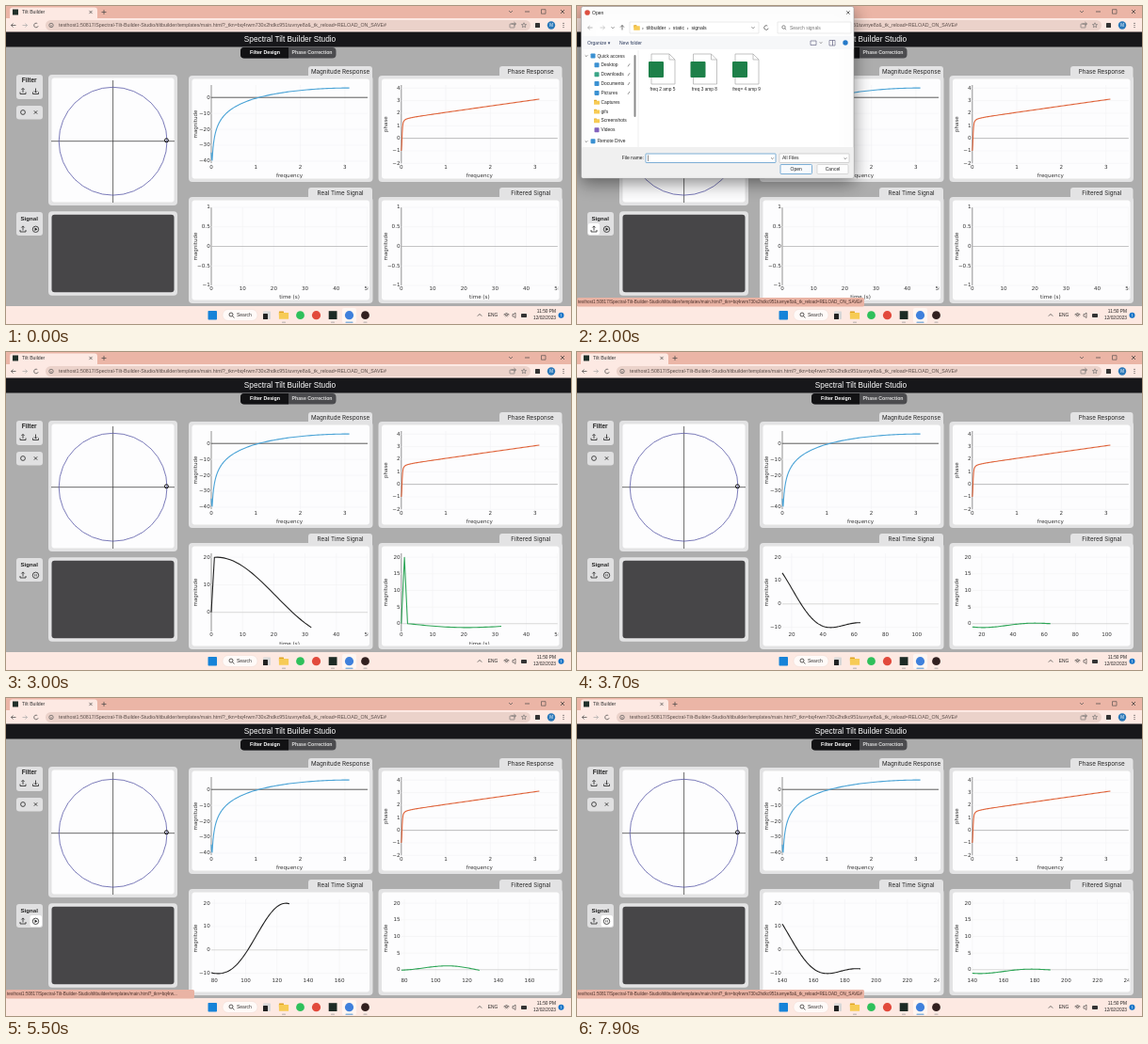
An HTML page with a canvas for the animation above (8 s loop, 600x338 px).

```html
<!DOCTYPE html>
<html lang="en">
<head>
<meta charset="utf-8">
<title>Tilt Builder</title>
<style>
html, body { margin: 0; width: 100%; height: 100%; overflow: hidden; background: #adadad; }
canvas { display: block; width: 600px; height: 338px; }
</style>
</head>
<body>
<canvas id="stage"></canvas>
<script>
const W = 600, H = 338, LOOP = 8000;
const UI = '"Liberation Sans", sans-serif';
const PLOT = '"DejaVu Sans", sans-serif';
const HEAD = 'Inter, sans-serif';
const cv = document.getElementById('stage');
const c = cv.getContext('2d');
const dpr = window.devicePixelRatio || 1;
cv.width = W * dpr;
cv.height = H * dpr;

const PAGE = 'testhost1:50817/Spectral-Tilt-Builder-Studio/tiltbuilder/templates/main.html?_tkn=';
const URL_TEXT = PAGE + 'bq4rwm730x2hdkc951tuvnye8z&_tk_reload=RELOAD_ON_SAVE#';
const URL_SHORT = PAGE + 'bq4rw...';

// ---------- drawing helpers ----------
function text(s, x, y, size, o = {}) {
  c.font = (o.bold ? 'bold ' : '') + size + 'px ' + (o.font || UI);
  c.textAlign = o.align || 'left';
  c.textBaseline = 'middle';
  c.fillStyle = o.color || '#222';
  if (o.rot) {
    c.save();
    c.translate(x, y);
    c.rotate(-Math.PI / 2);
    c.fillText(s, 0, 0);
    c.restore();
  } else c.fillText(s, x, y);
}
function box(x0, y0, x1, y1, fill, r = 0, stroke, lw = 0.6) {
  c.beginPath();
  c.roundRect(x0, y0, x1 - x0, y1 - y0, r);
  if (fill) { c.fillStyle = fill; c.fill(); }
  if (stroke) { c.strokeStyle = stroke; c.lineWidth = lw; c.stroke(); }
}
function disc(x, y, r, fill, stroke, lw = 0.7) {
  c.beginPath();
  c.arc(x, y, r, 0, 7);
  if (fill) { c.fillStyle = fill; c.fill(); }
  if (stroke) { c.strokeStyle = stroke; c.lineWidth = lw; c.stroke(); }
}
function path(pts, color = '#333', lw = 0.7) {
  c.beginPath();
  pts.forEach(([x, y], i) => i ? c.lineTo(x, y) : c.moveTo(x, y));
  c.strokeStyle = color;
  c.lineWidth = lw;
  c.lineJoin = 'round';
  c.stroke();
}
const line = (x0, y0, x1, y1, color, lw) => path([[x0, y0], [x1, y1]], color, lw);
function cross(x, y, r, color, lw) {
  line(x - r, y - r, x + r, y + r, color, lw);
  line(x - r, y + r, x + r, y - r, color, lw);
}
function chevron(x, y, r, dir = 1, color = '#555') {
  path([[x - r, y - dir * r / 2], [x, y + dir * r / 2], [x + r, y - dir * r / 2]], color, 0.7);
}
function arrow(x, y, dir, color = '#444') {
  line(x - 2.5, y, x + 2.5, y, color);
  path([[x + dir * 0.4, y - 2], [x + dir * 2.5, y], [x + dir * 0.4, y + 2]], color);
}
function reload(x, y) {
  c.beginPath();
  c.arc(x, y, 2.3, 0.3, 5.3);
  c.strokeStyle = '#444';
  c.lineWidth = 0.7;
  c.stroke();
}
function transfer(x, y, up) {
  path([[x - 3, y + 1], [x - 3, y + 3], [x + 3, y + 3], [x + 3, y + 1]], '#222', 0.8);
  line(x, y - 3, x, y + 1.5, '#222', 0.8);
  chevron(x, up ? y - 2.3 : y + 0.7, 1.7, up ? -1 : 1, '#222');
}
function folder(x, y, s = 1) {
  box(x - 3 * s, y - 2.4 * s, x, y, '#e0a526', 0.5);
  box(x - 3 * s, y - 1.6 * s, x + 3 * s, y + 2.4 * s, '#f7cb55', 0.5);
}

// ---------- filter: one zero just inside the unit circle ----------
const ZERO = { re: 0.99, im: 0.0157 };
const UNIT = { x: 113.6, y: 143.7, r: 57.4 };
const gain = w => 20 * Math.log10(Math.hypot(Math.cos(w) - ZERO.re, Math.sin(w) - ZERO.im));
const phase = w => Math.atan2(Math.sin(w) - ZERO.im, Math.cos(w) - ZERO.re);

// ---------- signals ----------
const wave = n => {
  if (n < 1) return 0;
  const p = 0.0507 * (n - 1.7);
  return 14 * Math.cos(p) + 6 * Math.cos(2 * p);
};
const filtered = n => n < 1 ? 0 : wave(n) - wave(n - 1);

const CLOCK = [[2300, 0], [3700, 64], [5300, 128], [6300, 128], [7900, 190]];
function samples(t) {
  if (t < CLOCK[0][0]) return -1;
  for (let i = 1; i < CLOCK.length; i++) {
    const [a, u] = CLOCK[i - 1], [b, v] = CLOCK[i];
    if (t <= b) return Math.floor(u + (v - u) * (t - a) / (b - a));
  }
  return 190;
}

// ---------- plots ----------
function axes(p) {
  const X = v => p.x + (v - p.x0) / (p.x1 - p.x0) * 166;
  const Y = v => p.bottom - (v - p.y0) / (p.y1 - p.y0) * (p.bottom - p.top);
  c.save();
  c.beginPath();
  c.rect(p.x - 20, p.top - 8, 186.4, p.clip - p.top + 8);
  c.clip();
  const label = { font: PLOT, color: '#333' };
  for (let v = Math.ceil(p.x0 / p.dx) * p.dx; v <= p.x1; v += p.dx) {
    line(X(v), p.top, X(v), p.bottom, v ? '#f1f1f3' : '#777', v ? 0.6 : 0.8);
    text(String(v), X(v), p.bottom + p.gap, 5.6, { ...label, align: 'center' });
  }
  for (let v = Math.ceil(p.y0 / p.dy) * p.dy; v <= p.y1 + 1e-6; v += p.dy) {
    line(p.x, Y(v), p.x + 166, Y(v), v ? '#f1f1f3' : p.zero, v ? 0.6 : 0.8);
    text(String(v).replace('-', '−'), p.x - 1.3, Y(v), 5.6, { ...label, align: 'right' });
  }
  text(p.ylab, p.x - 16, (p.top + p.bottom) / 2, 5.5, { ...label, align: 'center', rot: true });
  if (p.xlab) text(p.xlab, p.x + 83, p.xlabY, 5.6, { ...label, align: 'center' });
  path(p.pts.map(([x, y]) => [X(x), Y(y)]), p.color, 1.1);
  c.restore();
}
function response(x, y0, y1, dy, top, bottom, f, color, zero, ylab) {
  const pts = [];
  for (let w = 0; w < 3.14; w += w < 0.3 ? 0.01 : 0.05) pts.push([w, f(w)]);
  axes({ x, x0: 0, x1: 3.51, dx: 1, y0, y1, dy, top, bottom, gap: 4.5, clip: 186,
    zero, ylab, xlab: 'frequency', xlabY: 181, pts, color });
}
function signal(x, f, n, color) {
  const live = n >= 0, wide = n > 50, pts = [];
  let lo = 0, hi = 20;
  for (let i = 0; i <= n; i++) {
    const v = f(i);
    lo = Math.min(lo, v);
    hi = Math.max(hi, v);
    if (i >= n - 50) pts.push([i, v]);
  }
  const pad = (hi - lo) / 18, left = wide ? n - 50 : 0;
  axes({ x, x0: left, x1: left + (wide ? 100 : 50), dx: wide ? 20 : 10,
    y0: live ? lo - pad : -1, y1: live ? hi + pad : 1,
    dy: live ? (hi - lo > 25 ? 10 : 5) : 0.5,
    top: 214, bottom: 297, gap: 3.4, clip: live ? 311 : 313, zero: live ? '#cfcfcf' : '#b5b5b5',
    ylab: 'magnitude', xlab: wide ? '' : 'time (s)', xlabY: live ? 310.5 : 309.5, pts, color });
}

// ---------- page parts ----------
function browser() {
  box(0, 0, W, 14, '#ebb5a6');
  box(4, 1.5, 97, 16, '#fde9e3', 3);
  box(0, 13, W, 28, '#fde9e3');
  box(7, 3.5, 13, 9.5, '#20302a');
  text('Tilt Builder', 17, 6.7, 5.2, { color: '#333' });
  cross(90, 6.5, 1.6, '#444');
  line(101.5, 6.5, 106.5, 6.5, '#444');
  line(104, 4, 104, 9, '#444');
  chevron(536, 6, 2);
  line(551, 6, 556, 6, '#444');
  box(568.5, 3.7, 573, 8.2, null, 0, '#444');
  cross(591, 6, 2, '#333');
  arrow(8, 20.5, -1);
  arrow(20, 20.5, 1, '#aaa');
  reload(32, 20.5);
  box(42, 15, 557, 26, '#ebd2ca', 5.5);
  disc(48, 20.5, 2.2, null, '#555');
  line(48, 20, 48, 21.7, '#555');
  text(URL_TEXT, 56, 20.7, 5.3, { color: '#5a4c48' });
  box(535, 19, 540, 23, null, 0.5, '#666');
  arrow(539, 19, 1, '#666');
  path([0, 1, 2, 3, 4, 5, 6, 7, 8, 9, 10].map(i => {
    const r = i % 2 ? 1.2 : 2.7, a = i * Math.PI / 5 - Math.PI / 2;
    return [550 + r * Math.cos(a), 20.5 + r * Math.sin(a)];
  }), '#666', 0.6);
  box(562, 18, 567, 23, '#333', 0.6);
  disc(579, 20.5, 4.2, '#2b78b8');
  text('M', 579, 20.8, 4.5, { color: '#fff', align: 'center' });
  [18.4, 20.5, 22.6].forEach(y => disc(592, y, 0.6, '#444'));
}
function taskbar() {
  box(0, 319, W, H, '#fde9e2');
  box(214.5, 324, 224, 333.5, '#1683d8', 0.8);
  box(230, 322.5, 267, 334.5, '#fffaf8', 6, '#ead5cd', 0.4);
  disc(239, 328, 2, null, '#333', 0.8);
  line(240.5, 329.5, 242.3, 331.5, '#333', 0.8);
  text('Search', 245, 328.8, 5, { color: '#333' });
  box(273, 324.5, 281, 333, '#d8d8d8', 0.8);
  box(273, 327, 278, 333, '#222', 0.6);
  folder(295, 328.7, 1.7);
  disc(312.5, 328.7, 4.4, '#2fc05b');
  disc(329.5, 328.7, 4.6, '#e2493b');
  box(342.7, 324.2, 351.5, 333, '#1d2b25');
  box(357, 321, 372, 337, '#fff6f2', 2);
  disc(364.5, 328.7, 4.6, '#3f80dc');
  disc(381.5, 328.7, 4.4, '#32201f');
  [295, 347, 381.5].forEach(x => box(x - 2, 335.7, x + 2, 336.6, '#999', 0.4));
  box(360.5, 335.7, 368.5, 336.6, '#1573c7', 0.4);
  chevron(503, 328.5, 2.2, -1, '#333');
  text('ENG', 517, 328.8, 4.9, { align: 'center' });
  for (let r = 1; r < 4; r++) {
    c.beginPath();
    c.arc(531.5, 331, r * 1.4, -2.35, -0.8);
    c.strokeStyle = '#333';
    c.lineWidth = 0.7;
    c.stroke();
  }
  path([[538, 327.5], [539.3, 327.5], [541, 326], [541, 331.5], [539.3, 330], [538, 330], [538, 327.5]], '#333', 0.6);
  box(547, 327, 553, 331, '#333', 0.8);
  text('11:50 PM', 584, 325, 4.8, { align: 'right' });
  text('12/02/2023', 584, 332, 4.8, { align: 'right' });
  disc(589.5, 328.7, 3, '#1573c7');
  text('1', 589.5, 329, 4, { color: '#fff', align: 'center' });
}
function card(x0, y0, x1, y1, fill = '#fdfdfe', m = 3.5) {
  box(x0, y0, x1, y1, '#e3e3e4', 4);
  box(x0 + m, y0 + m, x1 - m, y1 - m, fill, 3);
}
function plotCard(x, y, title, tabX) {
  box(tabX, y - 10, x + 195, y + 8, '#e3e3e4', 3);
  card(x, y, x + 195.5, y + 113);
  text(title, (tabX + x + 195) / 2, y - 3.7, 6.25, { font: HEAD, align: 'center', color: '#222' });
}
function tools(playing, hover) {
  box(11, 73, 39, 99, '#e0e0e1', 3);
  text('Filter', 24.7, 79.5, 6.5, { bold: true, align: 'center' });
  transfer(18, 90.5, true);
  transfer(31.5, 90.5, false);
  box(11, 106, 39, 120.5, '#e0e0e1', 3);
  disc(18, 113, 2.4, null, '#222', 0.8);
  cross(31.5, 113, 1.7, '#222', 0.8);
  box(11, 219, 39, 244, '#e0e0e1', 3);
  text('Signal', 24.7, 226, 6.1, { bold: true, align: 'center' });
  if (hover === 'load') box(11.8, 231, 24, 243, '#fff', 2);
  if (hover === 'play') box(25.5, 231, 38, 243, '#fff', 2);
  transfer(18, 237, true);
  disc(31.5, 237.3, 3.2, null, '#222', 0.8);
  if (playing) {
    line(30.7, 236.2, 30.7, 238.4, '#333', 0.7);
    line(32.3, 236.2, 32.3, 238.4, '#333', 0.7);
  } else {
    c.beginPath();
    c.moveTo(30.5, 235.6);
    c.lineTo(33.5, 237.3);
    c.lineTo(30.5, 239);
    c.fillStyle = '#222';
    c.fill();
  }
}
function unitCircle() {
  const { x, y, r } = UNIT;
  card(45, 73, 182, 212);
  line(48, y, 179, y, '#444', 0.8);
  line(x, 79, x, 209, '#444', 0.8);
  disc(x, y, r, null, '#5a5aa8', 0.8);
  disc(x + r * ZERO.re, y - r * ZERO.im, 2, null, '#111', 1);
}
function statusBar(mode) {
  if (!mode) return;
  box(0, 310, mode === 'full' ? 305 : 200, 319.5, '#e9b3a4', 1.5);
  text(mode === 'full' ? URL_TEXT : URL_SHORT, 1, 314.8, 4.6, { color: '#4a302a' });
}
function dialog(alpha) {
  if (alpha <= 0) return;
  c.save();
  c.globalAlpha = alpha;
  if (alpha === 1) {
    c.shadowColor = 'rgba(0,0,0,.45)';
    c.shadowBlur = 18 * dpr;
    c.shadowOffsetY = 5 * dpr;
  }
  box(4.5, 0.5, 294, 183, '#fff', 2, '#999');
  c.shadowColor = 'transparent';
  disc(11, 7, 2.8, '#dd4f40');
  text('Open', 16, 7.2, 5);
  cross(288, 7, 1.7, '#333');
  arrow(14, 23, -1, '#999');
  arrow(27, 23, 1, '#bbb');
  chevron(38, 23, 1.5);
  c.save();
  c.translate(48, 23);
  c.rotate(-Math.PI / 2);
  arrow(0, 0, 1);
  c.restore();
  box(56, 17, 193, 29, '#fff', 0, '#ddd');
  folder(63.5, 23, 1.1);
  text('›  tiltbuilder  ›  static  ›  signals', 69, 23.2, 5.2);
  chevron(187, 23, 1.5);
  reload(201, 23);
  box(213, 17, 291, 29, '#fff', 0, '#ddd');
  disc(219.5, 22.5, 1.7, null, '#555');
  line(220.7, 23.8, 222, 25.2, '#555');
  text('Search signals', 226, 23.2, 5, { color: '#777' });
  box(5, 32, 293.5, 46, '#f6f7f9');
  text('Organize ▾', 11, 39.2, 5, { color: '#2b3a5c' });
  text('New folder', 45, 39.2, 5, { color: '#2b3a5c' });
  box(248, 37, 254, 41.5, null, 0, '#557');
  chevron(259, 39, 1.2);
  box(268, 36.5, 274, 42, '#fff', 0, '#557');
  line(271.5, 36.5, 271.5, 42, '#557');
  disc(285, 39, 2.7, '#2479c9');

  chevron(10, 53, 1.3);
  const side = ['Quick access', 'Desktop', 'Downloads', 'Documents', 'Pictures',
    'Captures', 'gifs', 'Screenshots', 'Videos', 'Remote Drive'];
  side.forEach((s, i) => {
    const sub = i > 0 && i < 9, x = sub ? 21 : 17, y = 53 + i * 9.85 + (i > 8 ? 2 : 0);
    if (i > 4 && i < 8) folder(x, y);
    else box(x - 2.5, y - 2.5, x + 2.5, y + 2.5, i === 8 ? '#8262bd' : i === 2 ? '#3aa587' : '#3b91d2', 0.8);
    text(s, x + 4.5, y + 0.2, 4.9);
    if (i > 0 && i < 5) line(56, y - 1.5, 54, y + 1.5, '#777', 0.8);
  });
  chevron(10, 144, 1.3);
  box(60.5, 52, 62.5, 118, '#8a8a8a', 1);
  line(65, 47, 65, 150, '#e5e5e5', 0.6);
  ['freq 2 amp 5', 'freq 3 amp 8', 'freq= 4 amp 9'].forEach((s, i) => {
    const x = 91 + i * 44.5;
    path([[x - 12, 51], [x + 7, 51], [x + 13, 57], [x + 13, 83], [x - 12, 83], [x - 12, 51]], '#aaa', 0.7);
    path([[x + 7, 51], [x + 7, 57], [x + 13, 57]], '#aaa', 0.7);
    box(x - 15, 59, x + 1, 76, '#1d8049', 1);
    text(s, x, 88.5, 4.8, { align: 'center' });
  });
  box(5, 150, 293.5, 182.5, '#f0f0f0', 1);
  text('File name:', 71, 162, 5, { align: 'right' });
  box(73, 157, 211, 166.5, '#fff', 0.5, '#5f9ccd', 0.8);
  line(75.5, 158.5, 75.5, 165, '#222', 0.5);
  chevron(207.5, 162, 1.4);
  box(215, 157, 289, 166.5, '#fff', 0.5, '#bbb');
  text('All Files', 218, 162, 5);
  chevron(285, 162, 1.4);
  box(216, 168.5, 249.5, 178.5, '#f7fafd', 1, '#5f9ccd', 0.8);
  text('Open', 232.7, 173.6, 5, { align: 'center' });
  box(255, 168.5, 288, 178.5, '#fdfdfd', 1, '#c4c4c4');
  text('Cancel', 271.5, 173.6, 5, { align: 'center' });
  c.restore();
}

// ---------- timeline ----------
const between = (t, a, b) => t >= a && t < b;
function dialogAlpha(t) {
  if (between(t, 1000, 2100)) return 1;
  return between(t, 2100, 2600) ? 0.07 : 0;
}
function render(t) {
  const n = samples(t);
  const playing = n >= 0 && !between(t, 5300, 6300);
  const overLoad = between(t, 800, 2700), overPlay = t >= 4900;
  const status = overLoad ? (t < 2000 ? 'short' : 'full')
    : overPlay ? (t < 5700 ? 'short' : 'full') : '';

  c.setTransform(dpr, 0, 0, dpr, 0, 0);
  box(0, 0, W, H, '#adadad');
  browser();
  box(0, 27.5, W, 43.5, '#17171a');
  text('Spectral Tilt Builder Studio', 301.5, 36.2, 8.3, { color: '#fff', align: 'center' });
  box(249, 44, 350.5, 55.5, '#4b4b4e', 4);
  box(249, 44, 300, 55.5, '#121214', [4, 0, 0, 4]);
  text('Filter Design', 275, 50, 5.3, { bold: true, color: '#fff', align: 'center' });
  text('Phase Correction', 325, 50, 5.2, { bold: true, color: '#ddd', align: 'center' });

  tools(playing, overLoad ? 'load' : overPlay ? 'play' : '');
  unitCircle();
  card(45, 218.3, 182, 307.8, '#474648');

  plotCard(194, 74, 'Magnitude Response', 321);
  plotCard(395.5, 74, 'Phase Response', 524);
  plotCard(194, 203, 'Real Time Signal', 321);
  plotCard(395.5, 203, 'Filtered Signal', 524);
  response(218, -41.2, 7.8, 10, 84, 167, gain, '#4aa3d6', '#333', 'magnitude');
  response(419.8, -2, 4.25, 1, 84, 167.3, phase, '#df6238', '#aaa', 'phase');
  signal(218, wave, n, '#222');
  signal(419.8, filtered, n, '#2da556');

  taskbar();
  statusBar(status);
  dialog(dialogAlpha(t));
}

const start = performance.now();
function tick() {
  const t = (performance.now() - start) % LOOP;
  render(Math.floor(t / 100) * 100);
  requestAnimationFrame(tick);
}
tick();
</script>
</body>
</html>
```
